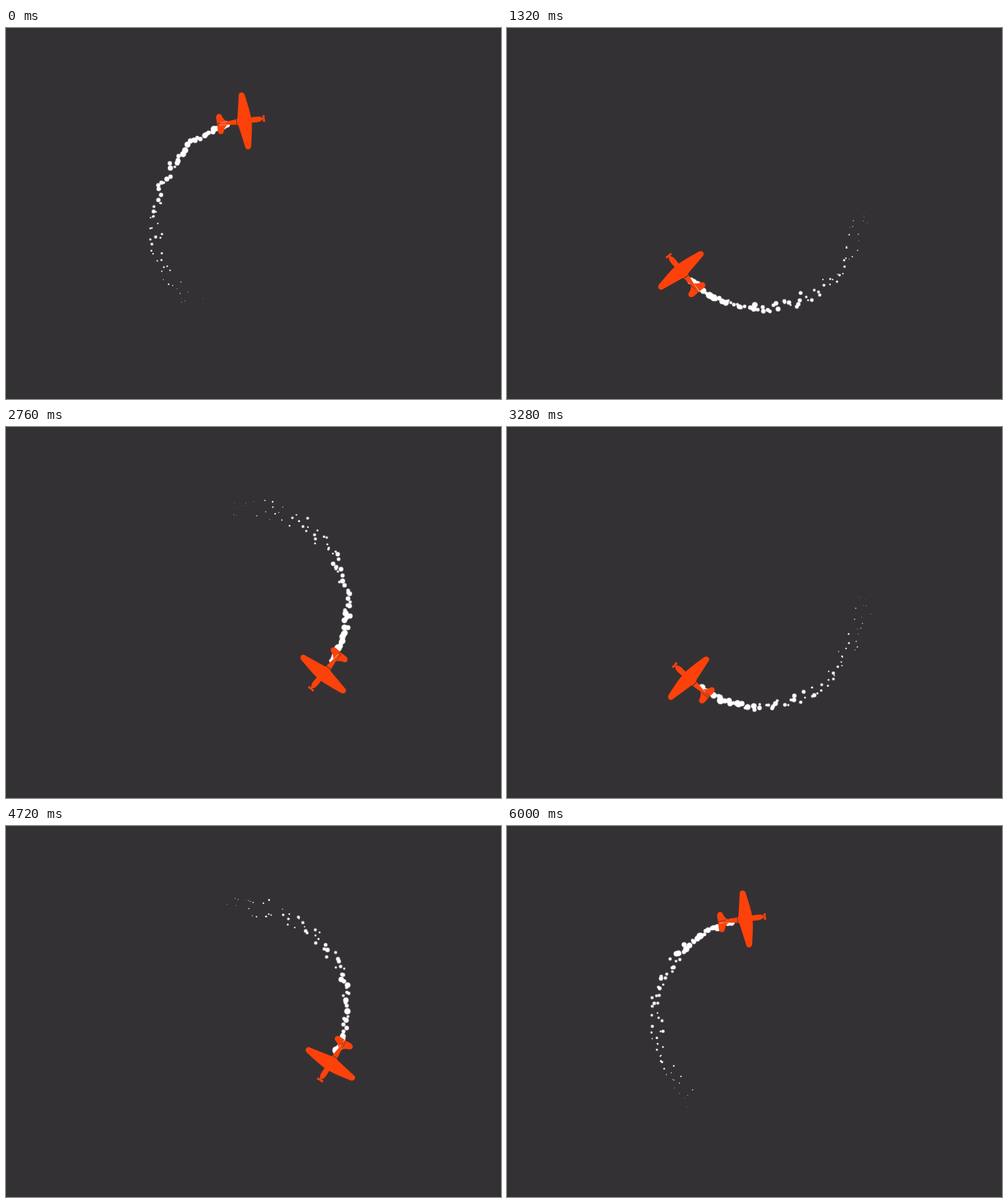
Animation of 800x600 px, one loop 6.04 s. Source, as an HTML page with a canvas:

```html
<!DOCTYPE html>
<html lang="en">
<head>
<meta charset="utf-8">
<title>Circling plane</title>
<style>
  html, body { margin: 0; width: 100%; height: 100%; overflow: hidden; background: #343134; }
  canvas { display: block; }
</style>
</head>
<body>
<canvas id="stage" width="800" height="600"></canvas>
<script>
const ctx = document.getElementById('stage').getContext('2d');

const LOOP = 6040, STEP = 40, LAP = 2000;
const CX = 400, CY = 300, ORBIT = 150.3;
const RATE = 0.12;            // puffs per ms
const LIFE = 640, DRIFT = 80; // ms, px travelled in a lifetime
const EXHAUST = { x: -17, y: -147.8 };

// Upper half of the plane, nose to the right; the lower half mirrors it.
const HALF = new Path2D([
  // wing
  'M-9 .4 L-9 -4.4 C-6.5 -4.6 -6.4 -6 -6 -8 L.2 -42 C.8 -48 8.8 -48 10 -41.5',
  'C12 -30 15.3 -13 15.5 -4.3 L15.5 .4 Z',
  // nose and spinner
  'M15 .4 L15 -4.3 C20 -4.6 26 -4.9 29 -4 C32 -3 33.5 -1.8 34 -1 L36.8 -1 L37.6 .4 Z',
  // propeller blade
  'M35.2 .4 C34.8 -1.5 33.6 -2.6 33.8 -4 C34 -6 37.6 -6 37.8 -4 C38 -2.6 36.8 -1.5 36.6 .4 Z',
  // rear fuselage
  'M-8 .4 L-8 -4.5 C-14 -4.2 -20 -3.2 -25 -2.4 L-40.5 -.8 L-40.5 .4 Z',
  // tailplane
  'M-40.2 -1.5 L-40.6 -10 C-40.5 -17.6 -33 -18 -31.3 -13.5 C-30 -9 -27.5 -5 -24 -3 Z'
].join(' '));

const angleAt = t => Math.PI * 2 * t / LAP - Math.PI * 0.04;

function rand(i, salt) {
  let h = Math.imul(i + 5003, 374761393) ^ Math.imul(salt + 17, 668265263);
  h = Math.imul(h ^ (h >>> 13), 1274126177);
  h = Math.imul(h ^ (h >>> 16), 2246822519);
  return ((h ^ (h >>> 15)) >>> 0) / 4294967296;
}

function puff(i, t) {
  const born = (i + rand(i, 1) - 0.5) / RATE;
  const age = (t - born) / LIFE;
  if (age < 0 || age >= 1) return null;
  const turn = angleAt(born), c = Math.cos(turn), s = Math.sin(turn);
  const spread = (rand(i, 2) - 0.5) * 0.5;
  const dist = DRIFT * age * (0.9 + 0.2 * rand(i, 3));
  const x = EXHAUST.x - dist * Math.cos(spread);
  const y = EXHAUST.y + (rand(i, 4) - 0.5) * 3 + dist * Math.sin(spread);
  const r = (2.6 + 4.1 * rand(i, 5)) * (1 - age);
  return { x: CX + x * c - y * s, y: CY + x * s + y * c, r };
}

function drawSmoke(t) {
  const puffs = [];
  for (let i = Math.floor((t - LIFE) * RATE) - 1; i <= t * RATE + 1; i++) {
    const p = puff(i, t);
    if (p) puffs.push(p);
  }
  // faint rim first, then the solid core
  for (const [grow, alpha] of [[0.6, 0.35], [-0.25, 1]]) {
    ctx.fillStyle = `rgba(255,255,255,${alpha})`;
    for (const p of puffs) {
      ctx.beginPath();
      ctx.arc(p.x, p.y, Math.max(0.15, p.r + grow * Math.min(1, p.r / 2)), 0, Math.PI * 2);
      ctx.fill();
    }
  }
}

function drawPlane(t) {
  ctx.save();
  ctx.translate(CX, CY);
  ctx.rotate(angleAt(t));
  ctx.translate(0, -ORBIT);
  ctx.fillStyle = '#fc420a';
  ctx.fill(HALF);
  ctx.scale(1, -1);
  ctx.fill(HALF);
  ctx.restore();
}

function draw(now) {
  const t = Math.floor((now % LOOP) / STEP) * STEP;
  ctx.fillStyle = '#343134';
  ctx.fillRect(0, 0, 800, 600);
  drawSmoke(t);
  drawPlane(t);
}

let start = null;
function tick(now) {
  if (start === null) start = now;
  draw(now - start);
  requestAnimationFrame(tick);
}
draw(0);
requestAnimationFrame(tick);
</script>
</body>
</html>
```
